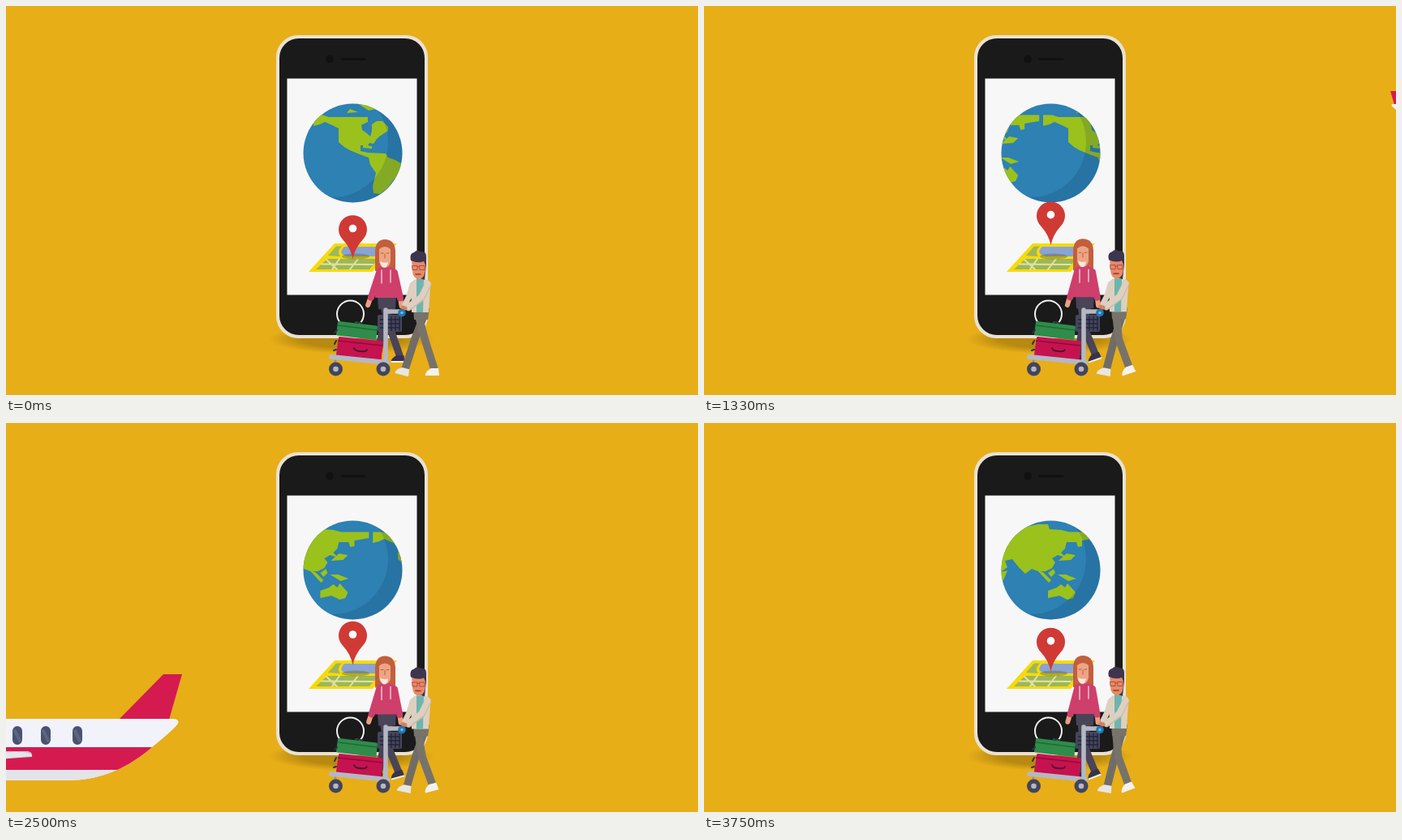
Animation of 853 by 480 pixels, one loop 3830 ms. Source, as an HTML page:

```html
<!DOCTYPE html>
<html lang="en">
<head>
<meta charset="utf-8">
<title>Travel app</title>
<style>
  html, body { margin: 0; width: 100%; height: 100%; overflow: hidden; background: #e7ae18; }
  svg { display: block; width: 853px; height: 480px; }
  .land { fill: #9bc11c; }
  .line { fill: none; stroke-linecap: round; stroke-linejoin: round; }
  .skin { stroke: #e9a080; stroke-width: 6; }
  .sleeve { stroke: #cf3f6b; stroke-width: 8; }
  .jeans { stroke: #4a4459; stroke-width: 9; }
  .trousers { stroke: #77736b; stroke-width: 9.5; }
  .far { filter: brightness(.95); }
</style>
</head>
<body>
<svg viewBox="0 0 853 480">
  <defs>
    <radialGradient id="shade">
      <stop offset=".6" stop-color="#8a6508" stop-opacity=".5"/>
      <stop offset="1" stop-color="#8a6508" stop-opacity="0"/>
    </radialGradient>
    <clipPath id="disc"><circle cx="427.5" cy="181.5" r="61"/></clipPath>
    <clipPath id="hull"><path d="M0 0C6-9 22-22 37-31C62-42 100-46 145-46H546Q553-45 551-40Q545-32 519-11C491 13 458 30 415 30H145C90 30 35 26 10 13Q1 7 0 0Z"/></clipPath>

    <!-- nose at 0,0, facing left -->
    <g id="plane">
      <path fill="#d51a50" d="M478-45L533-101H556L538-38Z"/>
      <g clip-path="url(#hull)">
        <path fill="#f2f2fb" d="M-5-50H560V35H-5Z"/>
        <path fill="#d51a50" d="M-5-11H560V17H-5Z"/>
        <path fill="#e3e4ea" d="M-5 17H560V35H-5Z"/>
        <path fill="#4b5270" d="M10-12L30-31H38Q41-25 37-19L30-12Z"/>
        <path fill="#6b7289" d="M12-12Q17-20 23-25L32-12Z"/>
      </g>
      <rect x="121" y="-42" width="24" height="51" rx="11" fill="#29233c" opacity=".17"/>
      <path class="line" stroke="#4b5270" stroke-width="12" d="M133-31v11M174-31v11M210-31v11M246-31v11M282-31v11M317-31v11M353-31v11M388-31v11M427-31v11"/>
      <path class="line" stroke="#5d647f" stroke-width="4" d="M130-31l6 12M171-31l6 12M207-31l6 12M243-31l6 12M279-31l6 12M314-31l6 12M350-31l6 12M385-31l6 12M424-31l6 12"/>
      <path fill="#c3c7cf" d="M218-6H366Q372-5 371 1L315 5L228 13Q212 13 211 3Q211-5 218-6Z"/>
      <path fill="#6c7893" d="M222 3Q227 1 232 1H322L308 10H228Q219 9 222 3Z"/>
      <path fill="#e4e6eb" d="M233 1L318-3Q371-8 371 0L325 4L235 9Z"/>
      <path fill="#e8e9f2" d="M308 10H321Q327 18 327 21Q326 27 308 30Z"/>
      <rect x="245" y="5" width="36" height="33" rx="6" fill="#c01548"/>
      <rect x="276" y="3" width="34" height="31" rx="6" fill="#c01548"/>
      <path fill="#d9dbe3" d="M245 20H275V37H250Q245 36 245 31ZM276 20H281V34H276Z" opacity=".35"/>
      <path fill="none" stroke="#e8d0dc" stroke-width="2" d="M279 6Q273 19 279 33"/>
    </g>
  </defs>

  <rect width="853" height="480" fill="#e7ae18"/>
  <use id="away" href="#plane"/>

  <!-- phone -->
  <ellipse cx="426" cy="411" rx="102" ry="18" fill="url(#shade)"/>
  <rect x="333" y="36" width="187" height="374" rx="27" fill="#e9e1d2"/>
  <rect x="337" y="40" width="179" height="366" rx="24" fill="#1a1a1a"/>
  <circle cx="399" cy="65.500" r="4.800" fill="#111"/>
  <path class="line" stroke="#111" stroke-width="3" d="M414 65.500H442"/>
  <rect x="346.500" y="89.500" width="160" height="267" fill="#f7f7f7"/>
  <circle cx="424.500" cy="380" r="16.500" fill="none" stroke="#f0f0ee" stroke-width="2"/>

  <!-- globe -->
  <g clip-path="url(#disc)">
    <rect x="366" y="120" width="123" height="123" fill="#2d81b3"/>
    <g id="land" class="land">
      <path d="M379 148V134.500H390L398 137H446V143L438 147L439 153L446 158L449 161L451 154V146L457 142H464L471 149V154L463 159L457 164L453 170L448 169L446 172H437V179L446 181L468 182L471 187L480 190L488 195L484 208L478 214L470 225L461 232L453 231L452 222L456 206L449 196L447 187L436 183L424 178L417 174L410 168V151L402 147L393 143L387 146Z"/>
      <path d="M420 132L424 127L434 131ZM433 120H452L456 127L447 129ZM440 171L451 173V176L440 175Z"/>
      <g transform="translate(-109.800)">
        <path d="M320 138L390 132L402 127L412 125H424L426 131L440 132L450 134.500H484V142L466 145V152L461 153L459 147H447L445 155L440 160L446 166L436 163L429 167L433 172L429 179L421 183L412 183L404 180L396 186L388 178L380 168L371 170L374 178L367 183L320 180Z"/>
        <path d="M366 184L374 182L369 194L362 197ZM437 170L447 161L458 163L452 169ZM411 182L418 184L428 194L425 197ZM424 185L431 180L433 185L428 190ZM436 187H446L459 192L449 195Z"/>
        <path d="M424 207L435 203L440 199L445 203L448 198L458 209L455 216L448 218L438 213L424 216Z"/>
      </g>
    </g>
    <path fill="#0c2c52" fill-rule="evenodd" opacity=".16" d="M330 100H500V260H330ZM335 168a68 68 0 1 0 136 0a68 68 0 1 0 -136 0Z"/>
  </g>

  <!-- map and pin -->
  <path fill="#f7da08" d="M405 293H482L452 328H373Z"/>
  <path fill="#8ba3d3" d="M417 297H474L463 309H421Q408 306 417 297Z"/>
  <path fill="#9db75a" d="M407 296.500H414Q407 303 412 309L397 308ZM396 312H459L448 325H382Z"/>
  <path class="line" stroke="#e2e3a0" stroke-width="2" d="M389 318.500L452 319M411 312L402 325M434 312L424 325M395 313L408 325"/>
  <ellipse cx="431" cy="309" rx="17" ry="3.500" fill="#5b6420" opacity=".4"/>
  <g id="pin">
    <path fill="#d03a35" d="M427.500 312Q425 299 415 288A17.500 17.500 0 1 1 440 288Q430 299 427.500 312Z"/>
    <circle cx="427.500" cy="274.500" r="4.800" fill="#fff"/>
  </g>

  <!-- woman -->
  <g id="herLegs"></g>
  <g id="her">
    <path fill="#4a4459" d="M458 355H481L480 372H459Z"/>
    <g id="armL">
      <path class="line skin" d="M455 362L454 369"/>
      <path class="line sleeve" d="M460 327L456 359"/>
    </g>
    <path fill="#c25f3d" d="M455 325V300Q456 286 467 286Q479 286 480 300V326Z"/>
    <path fill="#cf3f6b" d="M457 323Q468 316 479 322L483 358H455Z"/>
    <path fill="#eda584" d="M460 298Q467 292 474 298V313Q473 320 467 321Q460 319 460 312Z"/>
    <path fill="#f6e6e2" d="M461 313Q466 316 471 314Q470 321 466 321Q462 320 461 313Z"/>
    <path class="line" stroke="#b85d45" d="M462 303H465M469 303H472M467 304V309"/>
    <path class="line" stroke="#f4dce3" stroke-width="1.300" d="M463 324V340M474 324V339"/>
    <g id="armR">
      <path class="line skin" d="M481 362V369"/>
      <path class="line sleeve" d="M479 327L481 359"/>
    </g>
  </g>

  <!-- trolley -->
  <rect x="458" y="381" width="30" height="21" rx="2" fill="#45465b"/>
  <path fill="none" stroke="#23243a" stroke-width="1.300" d="M461 387H486M461 392H486M461 397H486M475 383V401M480 383V401M485 383V401"/>
  <path class="line" stroke="#b5b8c3" stroke-width="5.500" d="M468 375V442M468 377H487"/>
  <path class="line" fill="#2f8c4a" stroke="#2f8c4a" stroke-width="3" d="M410.500 390.500L456.500 396L455 410.500L408.500 405Z" style="fill:#2f8c4a"/>
  <path fill="none" stroke="#1f6a38" stroke-width="1.500" d="M409 394L457 400M431 392V390L438 391V393"/>
  <path class="line" stroke="#c71250" stroke-width="3" d="M411.500 409.500L463.500 415Q462 427 461 436.500L408.500 430Z" style="fill:#c71250"/>
  <path fill="none" stroke="#8d0c39" stroke-width="1.500" d="M409 413L464 419"/>
  <path class="line" stroke="#4a1730" stroke-width="1.800" d="M429 422Q430 426 437 426Q444 427 445 424"/>
  <path class="line" stroke="#2b3340" stroke-width="2" d="M408 400L405 403M407 413L405 417M407 424L404 425M433 390L437 391"/>
  <path class="line" stroke="#b5b8c3" stroke-width="6" d="M401 433L470 440"/>
  <path class="line" stroke="#8e92a1" stroke-width="3" d="M406 438V444M465 441V446"/>
  <g fill="#42455b">
    <circle cx="406.500" cy="448" r="8.500"/><circle cx="465" cy="448" r="8.500"/>
  </g>
  <g fill="#b5b8c3">
    <circle cx="406.500" cy="448" r="3.300"/><circle cx="465" cy="448" r="3.300"/>
  </g>

  <!-- man -->
  <g id="hisLegs"></g>
  <g id="him">
    <path fill="#77736b" d="M502 372H522L520 386H503Z"/>
    <path fill="#ddd0c0" d="M499 341Q503 335 510 335L520 337Q524 340 523 347L521 377H500Z"/>
    <path fill="#6db5ae" d="M506 336H515L514 377H506Z"/>
    <path class="line" stroke="#ddd0c0" stroke-width="7" d="M501 343L497 357L492 367"/>
    <path class="line" stroke="#c9bba9" stroke-width="8.500" d="M520 343L512 359L496 371"/>
    <path class="line" stroke="#ddd0c0" stroke-width="7" d="M520 342L512 358L496 370"/>
    <path class="line" stroke="#d9805c" stroke-width="5" d="M489 371L492 372"/>
    <path fill="#3d3450" d="M513 318H518L516 337L511 335Z"/>
    <path fill="#e88a66" d="M500 312H517V322Q517 334 510 336Q501 336 501 325Z"/>
    <path fill="#3d3450" d="M499 313Q497 304 503 303Q507 299 511 302Q518 301 518 308V321L515 314Q508 317 499 313Z"/>
    <path fill="none" stroke="#9c3f3a" stroke-width=".8" d="M500.500 319.500H507V324.500H501ZM509.500 319.500H516V324.500H510ZM507 321H509.500"/>
    <path class="line" stroke="#8f3a34" stroke-width="1.500" d="M505 330H511"/>
  </g>
  <circle cx="488" cy="378.500" r="4.800" fill="#2178b5"/>
  <circle cx="488" cy="378.500" r="1.700" fill="#7fb9df"/>

  <use id="near" href="#plane"/>
</svg>

<script>
const LOOP = 3830, FRAMES = 46, STRIDE = 14.4, HOP = 11;
const $ = id => document.getElementById(id);
const place = (id, value) => $(id).setAttribute('transform', value);

// Hip to knee to ankle, with a shoe pointing left.
function leg(o, hipX, phase) {
  const swing = Math.max(0, -Math.sin(phase)), c = Math.cos(phase);
  const x = o.mid - o.reach * c, y = o.ankle - 4 * swing;
  const kneeX = (hipX + x) / 2 - 1 - 5 * swing, kneeY = (o.hipY + y) / 2;
  const tilt = c > 0 ? 14 * c : -30 * swing;
  return `<path class="line ${o.cloth}" style="stroke-linecap:butt" d="M${hipX} ${o.hipY}L${kneeX} ${kneeY}L${x} ${y}"/>
    <g transform="translate(${x} ${y}) rotate(${tilt})">
      <path fill="${o.shoe}" d="M-4 -1H5L6 7H-11Q-11 3 -4 -1Z"/>
      <path fill="#f4f2ee" d="M-11 6H6V8H-11Z"/>
    </g>`;
}

// The hips stand apart, so the legs cross on every other step.
const walk = (o, phase) =>
  `<g class="far">${leg(o, o.hipX + 4.5, phase)}</g>` + leg(o, o.hipX - 4.5, phase + Math.PI);

const his = { hipX: 512, hipY: 378, mid: 510, reach: 18, ankle: 448, cloth: 'trousers', shoe: '#f4f2ee' };
const hers = { hipX: 469, hipY: 366, mid: 471.5, reach: 14, ankle: 432, cloth: 'jeans', shoe: '#37334a' };

function draw(now) {
  const f = Math.floor((now + 8) % LOOP / LOOP * FRAMES);
  const phase = f / STRIDE * 2 * Math.PI, s = Math.cos(phase);
  const hop = f / HOP % 1, bob = 2 * s * s;

  place('land', `translate(${2.44 * f})`);
  place('pin', `translate(0 ${-17 * 4 * hop * (1 - hop)})`);
  place('away', `translate(${684 + 65 * (f - 11)} 134.5) scale(-.293 .293)`);
  place('near', `translate(${672 - 101.1 * (f - 20)} 411)`);

  place('her', `translate(0 ${bob})`);
  place('him', `translate(0 ${bob - 1})`);
  place('armL', `rotate(${11 * s} 460 327)`);
  place('armR', `rotate(${-9 * s} 479 327)`);
  $('hisLegs').innerHTML = walk(his, phase);
  $('herLegs').innerHTML = walk(hers, phase);
}

function tick() {
  draw(performance.now());
  requestAnimationFrame(tick);
}
tick();
</script>
</body>
</html>
```
